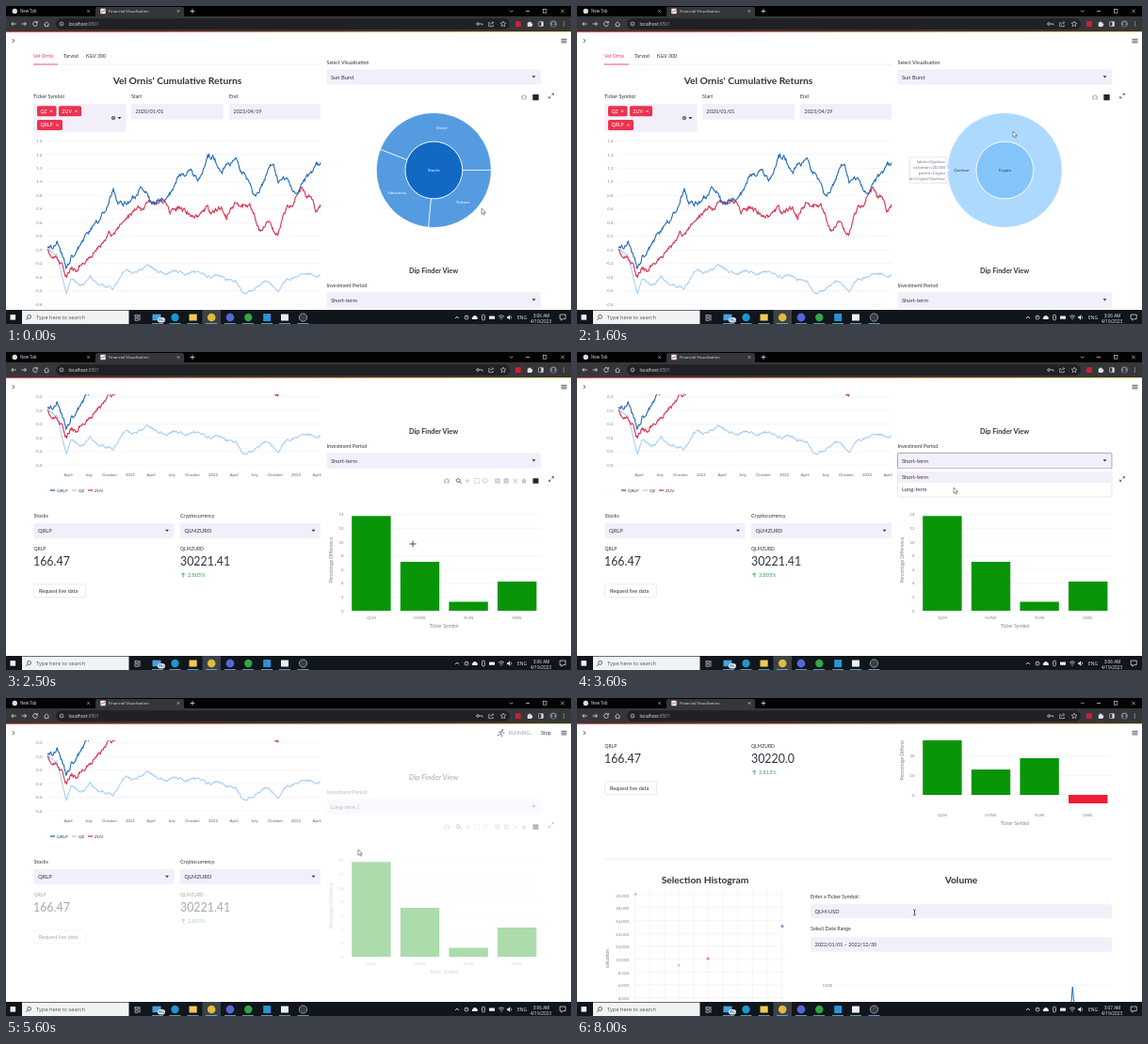
Write an HTML page that moves like this. It is 600 by 338 pixels and loops after 8100 ms.

```html
<!DOCTYPE html>
<html lang="en">
<head>
<meta charset="utf-8">
<title>Financial Visualisation</title>
<style>
html,body{margin:0;width:100%;height:100%;overflow:hidden;background:#fff}
svg{display:block;width:100vw;height:100vh}
text{font-family:Lato,"Open Sans",sans-serif;white-space:pre}
.ui text{font-family:"Open Sans","Noto Sans",sans-serif}
</style>
</head>
<body>
<svg id="stage" viewBox="0 0 600 338" xmlns="http://www.w3.org/2000/svg"></svg>
<script>
const LOOP = 8100, STEP = 100;
const INK = '#31333f', MUTE = '#7d8092', FIELD = '#f3effa', GRID = '#ece9f3';
const BLUE = '#1f69bb', RED = '#d9304d', SKY = '#a6cff5', GREEN = '#089508';

// drawing helpers; text y is the middle of the capitals
const text = (x, y, s, size = 5.35, o = {}) =>
  `<text x="${x}" y="${(y + size * .36).toFixed(2)}" font-size="${size}" fill="${o.fill || INK}" ` +
  `text-anchor="${o.at || 'start'}" font-weight="${o.weight || 400}"${o.turn ? ` transform="rotate(-90 ${x} ${y})"` : ''}>${s}</text>`;
const rect = (x, y, w, h, fill, r = 0, extra = '') =>
  `<rect x="${x}" y="${y}" width="${w}" height="${h}" fill="${fill}" rx="${r}" ${extra}/>`;
const disc = (x, y, r, fill, extra = '') => `<circle cx="${x}" cy="${y}" r="${r}" fill="${fill}" ${extra}/>`;
const line = (d, color, w = .7, extra = '') =>
  `<path d="${d}" fill="none" stroke="${color}" stroke-width="${w}" ${extra}/>`;
const group = (id, body, extra = '') => `<g id="${id}" ${extra}>${body}</g>`;
const title = (x, y, s, size = 10.3) => text(x, y, s, size, { at: 'middle', weight: 700 });
const arrow = (x, y) => `<path d="M${x - 2} ${y - 1}h4l-2 2.3z" fill="${INK}"/>`;
const cross = (x, y, r, c, w = .6) => line(`M${x - r} ${y - r}l${2 * r} ${2 * r}m0 ${-2 * r}l${-2 * r} ${2 * r}`, c, w);
const field = (x, y, w, s, size = 5.8, h = 16.5) => rect(x, y, w, h, FIELD, 1.5) + text(x + 4.5, y + h / 2, s, size);
const select = (x, y, w, s) => field(x, y, w, s) + arrow(x + w - 7.5, y + 8);

function random(seed) {
  return () => (seed = (seed * 16807) % 2147483647) / 2147483647;
}
function wiggle(ys, amp, seed) {
  const rnd = random(seed);
  let d = '', n = 0;
  for (let x = 0; x < 290; x += .7) {
    const i = Math.floor(x / 5), f = x / 5 - i;
    n = n * .6 + (rnd() - .5) * amp;
    d += (d ? 'L' : 'M') + (44 + x).toFixed(1) + ' ' + (ys[i] + (ys[i + 1] - ys[i]) * f + n).toFixed(1);
  }
  return d;
}

const blueY = [258,256,251,264,279,267,262,255,246,240,233,227,218,208,194,210,209,211,204,201,193,197,209,210,206,204,200,190,181,180,
  173,178,184,176,158,160,166,176,171,168,160,173,182,191,203,199,186,174,165,186,181,185,197,202,191,183,178,170,166];
const redY = [260,264,269,275,288,278,281,275,271,269,261,257,250,241,246,235,229,225,221,213,218,212,208,210,205,208,219,215,214,217,
  220,223,224,217,215,221,216,214,225,215,209,213,211,212,223,238,236,228,239,243,225,212,213,198,194,203,200,221,212];
const skyY = [261,262,264,285,307,290,294,297,295,286,292,296,297,298,300,293,283,282,284,282,280,275,277,280,283,286,283,281,283,285,
  284,283,282,284,287,289,286,287,291,290,292,301,305,303,302,297,292,293,299,303,294,291,289,287,286,285,285,287,285];

function returnsChart() {
  let s = '';
  for (let i = 0; i <= 12; i++) {
    const y = 143.5 + i * 14.46, v = 1.6 - i * .2;
    s += line(`M44 ${y}H334`, GRID, .5) + text(38.5, y, (Math.abs(v) < .01 ? 0 : v).toFixed(1), 4.4, { at: 'end', fill: MUTE });
  }
  const months = ['April', 'July', 'October'];
  for (let i = 0; i < 13; i++)
    s += text(66 + i * 22, 327, i % 4 === 3 ? 2021 + (i - 3) / 4 : months[i % 4], 4.4, { at: 'middle', fill: '#5f6275' });
  s += line(wiggle(skyY, 2.2, 77), SKY, 1.1) + line(wiggle(redY, 3.8, 41), RED, 1.1) + line(wiggle(blueY, 4, 19), BLUE, 1.1);
  [[47, BLUE, 'QRLP'], [70, SKY, 'QZ'], [87, RED, 'ZUV']].forEach(([x, c, n]) =>
    s += line(`M${x} 344h5`, c, 1.3) + text(x + 7, 344, n, 4.6));
  return s;
}

function chip(x, y, w, s) {
  return rect(x, y, w, 11, '#ea3350', 1.5) + text(x + 3.5, y + 5.5, s, 5.2, { fill: '#fff' }) + cross(x + w - 5.5, y + 5.5, 1.2, '#fff');
}

function topLeft() {
  return text(29, 53.5, 'Vel Ornis', 5.35, { fill: '#f0435a' }) + text(61, 53.5, 'Tarvod') + text(85, 53.5, 'K&amp;V 300') +
    line('M29 62.2H334', '#e9e8ef', .7) + line('M29 62H55', '#f0435a', .9) +
    title(182, 79, "Vel Ornis' Cumulative Returns") +
    text(29, 96, 'Ticker Symbol') + rect(29, 104, 98.5, 30, FIELD, 1.5) +
    chip(33, 106.3, 20.5, 'QZ') + chip(56, 106.3, 24, 'ZUV') + chip(33, 121, 27, 'QRLP') +
    disc(114, 119, 2.1, '#4b4d5a') + cross(114, 119, .8, '#fff', .5) + arrow(120.5, 119) +
    text(133, 96, 'Start') + field(133, 104, 98, '2020/01/01', 5.4) +
    text(237, 96, 'End') + field(237, 104, 97, '2023/04/19', 5.4);
}

const camera = (x, y) => rect(x - 3, y - 1.8, 6, 4.2, '#c3c4ce', .6) + rect(x - 1.2, y - 2.7, 2.4, 1.2, '#c3c4ce') + disc(x, y + .3, 1.2, '#fff');
const expand = (x, y) => line(`M${x + .6} ${y - .6}l1.8 -1.8m-1.8 0h1.8v1.8M${x - .6} ${y + .6}l-1.8 1.8m1.8 0h-1.8v-1.8`, '#4b4d5a', .8);

function modebar(y) {
  const c = '#c3c4ce';
  return camera(468, y) +
    disc(480.3, y - .5, 1.9, 'none', `stroke="#62647a" stroke-width="1"`) + line(`M481.6 ${y + .9}l2 2`, '#62647a', 1) +
    line(`M487.5 ${y}h5M490 ${y - 2.6}v5.2`, c, .9) +
    rect(497.5, y - 2.5, 5, 5, 'none', 0, `stroke="${c}" stroke-width=".8" stroke-dasharray="1 .5"`) +
    `<ellipse cx="509" cy="${y - .5}" rx="2.8" ry="1.9" fill="none" stroke="${c}" stroke-width=".8"/>` + line(`M507.3 ${y + 1}l-.7 2`, c) +
    rect(519.3, y - 2.6, 5.2, 5.2, c) + line(`M520.4 ${y}h3M521.9 ${y - 1.5}v3`, '#fff', .8) +
    rect(528.6, y - 2.6, 5.2, 5.2, c) + line(`M529.7 ${y}h3`, '#fff', .8) +
    cross(541, y, 2.4, c, .9) +
    `<path d="M547 ${y}l3 -2.8l3 2.8h-1v2.5h-4v-2.5z" fill="${c}"/>` +
    rect(559.5, y - 2.8, 6, 5.6, '#24252f', .6) + expand(579, y - 2);
}

// tick step, pixel per tick, baseline and bar tops are in page coordinates
function barChart(step, count, gap, base, tops) {
  const names = ['QLM', 'HVNX', 'YLVN', 'OSRL'];
  let s = '';
  for (let i = 0; i <= count; i++) {
    const y = base - i * gap;
    s += line(`M362 ${y}H568`, GRID, .5) + text(358.5, y, i * step, 4.4, { at: 'end', fill: MUTE });
  }
  tops.forEach((top, i) => {
    s += rect(367.2 + i * 51.6, Math.min(top, base), 41.4, Math.abs(base - top), top > base ? '#ee1c34' : GREEN) +
      text(388 + i * 51.5, 479, names[i], 4.3, { at: 'middle', fill: MUTE });
  });
  return s;
}

function rightSide() {
  const center = { at: 'middle', fill: MUTE };
  return text(340.5, 60, 'Select Visualisation') + select(340.5, 67.3, 227.5, 'Sun Burst') +
    camera(550, 97) + rect(559.3, 94, 6.4, 6.2, '#24252f', .6) + expand(579, 95.5) +
    group('burst', '') +
    title(454, 281, 'Dip Finder View', 7.3) + text(340.5, 297, 'Investment Period') +
    rect(340.5, 304.3, 227.5, 16.5, FIELD, 1.5, 'id="period"') + arrow(560.5, 312.3) +
    group('short', text(345, 312.5, 'Short-term', 5.8)) +
    group('long', text(345, 312.5, 'Long-term', 5.8) + line('M374 309.5v6', INK, .5)) +
    modebar(334) +
    group('bars1', barChart(2, 7, 14.6, 472, [371.3, 420, 462.5, 441])) +
    group('bars2', barChart(10, 4, 20.6, 458, [371.5, 431, 419, 467])) +
    text(465, 488, 'Ticker Symbol', 5, center) + text(345, 418, 'Percentage Difference', 5, { ...center, turn: 1 });
}

function lower() {
  let s = line('M29 526H568', '#e4e2ea', .6) + title(136, 548, 'Selection Histogram') + title(408, 548, 'Volume');
  for (let i = 0; i < 9; i++) {
    const y = 564 + i * 13.7;
    s += line(`M61 ${y}H219`, '#efe4ef', .5) +
      text(55, y + 1, (20 - 2 * i) + ',000', 4.4, { at: 'end', fill: MUTE });
  }
  for (let x = 61.5; x < 220; x += 15.6) s += line(`M${x} 560V690`, '#f1e6f1', .5);
  s += text(32, 632, 'valuation', 5, { at: 'middle', fill: MUTE, turn: 1 });
  [[62, 563.5, '#a9d3ef'], [108, 639, '#b9d6ea'], [139, 632, '#ea7d93'], [218, 597.5, '#6a9ae0']].forEach(([x, y, c]) => s += disc(x, y, 1.6, c));
  return s + text(248, 566, 'Enter a Ticker Symbol:') + field(248, 574.3, 320, 'QLM-USD', 5.6, 15) +
    text(248, 600.5, 'Select Date Range') + field(248, 609.3, 320, '2022/01/01 – 2022/12/30', 5.4, 15.5) +
    text(271, 660.5, '120B', 4.4, { at: 'end', fill: MUTE }) + line('M275 660.5H568', GRID, .5) +
    line('M524.8 682L526.2 662L527 670L528 682', BLUE, 1);
}

function leftLower() {
  return group('picks',
      text(29.5, 371, 'Stocks') + select(29.5, 378.8, 149, 'QRLP') +
      text(185, 371, 'Cryptocurrency') + select(185, 378.8, 149, 'QLMZURD')) +
    group('metrics',
      text(29.5, 406, 'QRLP', 5) + text(29, 420, '166.47', 12.4) + text(185, 406, 'QLMZURD', 5) +
      group('price1', text(185, 420, '30221.41', 12.4) + text(193, 434, '2.805%', 5.6, { fill: '#2f9c58' })) +
      group('price2', text(185, 420, '30220.0', 12.4) + text(193, 434, '2.813%', 5.6, { fill: '#2f9c58' })) +
      line('M188.3 436.5v-4.6m-2 2l2 -2l2 2', '#2f9c58', .8) +
      rect(29.5, 443.8, 55, 14, '#fff', 1.5, 'stroke="#dddbe3" stroke-width=".6"') + text(35, 451, 'Request live data', 5.5));
}

function pageOverlay() {
  const note = { at: 'end', fill: '#6f7288' };
  const box = 'stroke="#cfc6e2" stroke-width=".5"';
  return group('tip1', `<path d="M353.5 160.8h39.5v11l3 2.7l-3 2.7v11h-39.5z" fill="#fff" ${box}/>` +
      ['labels=Quelmar', 'valuation=20,000', 'parent=Crypto', 'id=Crypto/Quelmar'].map((s, i) => text(391, 165.5 + i * 6, s, 4.4, note)).join('')) +
    group('tip2', `<path d="M462 230h36v8h-36z" fill="#fff" ${box}/>` + text(463.5, 234, '(HVNX, 13.16151)', 4.2, { fill: '#6f7288' })) +
    group('menu', rect(340.5, 124, 227.5, 30, '#fff', 2, 'stroke="#dcd8e6" stroke-width=".6"') +
      rect(341, 127, 226.5, 12, FIELD) + text(345, 133, 'Short-term', 5.8) + text(345, 145.5, 'Long-term', 5.8));
}

function header() {
  return rect(0, 27, 600, 18, '#fff') + rect(0, 26.7, 600, 1.3, 'url(#glow)') +
    line('M6.8 35l2 2l-2 2', INK, .8) + line('M589.5 35.3h6M589.5 37.1h6M589.5 38.9h6', INK, .8) +
    group('running',
      group('legsA', line('M526.5 35.5l-1.5 2.5l2 1.2l-.5 2.3M525 38l-1.2 1.6h-2M526.5 35.6l-2.4 .4l-1 1.2M526.5 35.8l1.4 1.4l1.5 -.4', '#777988', .9)) +
      group('legsB', line('M526.3 35.5l-1 2.8l1.8 .8l1 2M525.3 38.2l.2 1.8l-2 1.2M526.3 35.6l-1.6 1.6l.6 1M526.3 35.8l1.8 .6l.9 -1.3', '#777988', .9)) +
      disc(527.3, 34, 1, '#777988') + text(534, 37, 'RUNNING...', 4.7, { fill: '#9a9ba6' }) + text(568, 37, 'Stop', 5.3));
}

function browser() {
  const w = '#dfe1e5';
  let s = rect(0, 0, 600, 12, '#030304') + rect(0, 11, 600, 16, '#35363a') + `<path d="M95 11V3q0-2 2-2H187q2 0 2 2V11z" fill="#35363a"/>` +
    disc(9.3, 5.5, 2.7, '#dadce0') + text(15, 5.5, 'New Tab', 4.4, { fill: w }) + cross(87.5, 5.5, 1.2, w) +
    rect(100.3, 2.8, 5.4, 5.4, '#f1f1f1', .4) + line('M101 7l1.5 -2l1 1l1.6 -2.4', '#d63838', .7) +
    text(109, 5.5, 'Financial Visualisation', 4.2, { fill: w }) + cross(183, 5.5, 1.2, w) + line('M195.7 5.5h4.6M198 3.2v4.6', w, .8) +
    line('M535 4.7l1.6 1.6l1.6 -1.6M552 5.5h4', w) + rect(570.3, 3.6, 3.6, 3.6, 'none', 0, `stroke="${w}" stroke-width=".6"`) + cross(591, 5.5, 1.8, w);
  s += line('M10.8 19h-5m2 -2l-2 2l2 2', w, .8) + line('M16.5 19h5m-2 -2l2 2l-2 2', w, .8) +
    line('M33 17.6a2.4 2.4 0 1 0 .4 1.8M33.4 16.2v1.8h-1.9', w, .8) + line('M40.5 19.3l2.6 -2.4l2.6 2.4M41.3 19v2.6h3.6v-2.6', w, .7) +
    rect(53, 13.2, 482, 11.8, '#202124', 5.9) + disc(59, 19, 2, 'none', `stroke="${w}" stroke-width=".6"`) + line('M59 18.7v1.4M59 17.6v.5', w, .6) +
    text(66.5, 19, 'localhost<tspan fill="#9aa0a6">:8501</tspan>', 4.8, { fill: '#f0f1f3' }) +
    disc(501, 19, 1.3, 'none', `stroke="${w}" stroke-width=".7"`) + line('M502.3 19h3.6v1.4', w) +
    line('M514 17.6h-1.3v4h4.6v-1.6M514.4 19.8q.4 -2.2 3.2 -2.2m-1.2 -1.2l1.3 1.2l-1.3 1.2', w, .6) +
    line('M528 16.2l.9 1.8l2 .2l-1.5 1.4l.4 2l-1.8 -1l-1.8 1l.4 -2l-1.5 -1.4l2 -.2z', w, .6) +
    rect(541, 16.2, 5.8, 5.8, '#cf2036', 1) + `<path d="M553.8 17.4h1.3a1 1 0 0 1 2 0h1.3v1.4a1 1 0 0 1 0 2v1.2h-4.6z" fill="${w}"/>` +
    rect(565.6, 16.7, 4.8, 4.8, 'none', .6, `stroke="${w}" stroke-width=".6"`) + rect(568.4, 16.7, 2, 4.8, w) +
    disc(581.3, 19, 3.6, '#76808c') + disc(581.3, 18.2, 1.2, '#262b33') + `<path d="M579 21.6q2.3 -4 4.6 0z" fill="#262b33"/>`;
  return s + [17, 19, 21].map(y => disc(592.3, y, .55, w)).join('');
}

function taskbar() {
  const w = '#eef1f4', c = { at: 'middle', fill: w };
  let s = rect(0, 323, 600, 15, '#10161c') + rect(4.5, 328, 5.6, 5.6, '#eef3f8') +
    rect(17, 323.6, 113.5, 14.4, '#f1f2f3') + disc(24.6, 330.3, 2, 'none', 'stroke="#333" stroke-width=".7"') + line('M23.2 331.8l-2 2', '#333') +
    text(32, 331, 'Type here to search', 5.7, { fill: '#4e5257' }) +
    rect(137, 328.6, 3.2, 2.2, 'none', 0, `stroke="${w}" stroke-width=".6"`) + rect(137, 332, 3.2, 2.2, 'none', 0, `stroke="${w}" stroke-width=".6"`) + line('M142 328v6.5', w, .7) +
    rect(208.5, 323, 19.5, 15, '#3b4248') +
    rect(155.5, 327.6, 9, 6.6, '#45a4e0') + rect(161, 331, 8, 5.4, '#dfe9f0', 2.7) + text(165, 333.8, '99+', 3.6, { at: 'middle', fill: '#1c2530' }) +
    disc(179.5, 331, 4.2, '#1f96cc') + rect(194.5, 327.5, 8.2, 7, '#f4ca55') + disc(218.2, 331, 4.3, '#e5b93c') +
    disc(238, 331, 4.4, '#5865d6') + disc(257.3, 331, 4.2, '#32a644') + rect(273.2, 327, 8, 8, '#2b93d6') +
    rect(292, 327.5, 8, 7, '#edf0f2') + disc(315.5, 331, 4.2, '#3d3c42', 'stroke="#b9b9be" stroke-width=".7"');
  [161, 179.5, 198.5, 218, 238, 257, 277, 296, 315.5].forEach(x => s += line(`M${x - 6} 337.5h12`, '#7cb5df', .8));
  s += line('M477 332l2 -2l2 2', w, .8) + disc(489, 331, 2, 'none', `stroke="${w}" stroke-width=".7"`) + line('M489 329.5v1.7', w, .6) +
    `<path d="M495.4 333a1.4 1.4 0 0 1 .5 -2.6a2.1 2.1 0 0 1 3.9 -.1a1.5 1.5 0 0 1 .5 2.7z" fill="${w}"/>` +
    rect(505.5, 328.2, 3, 5.6, 'none', 1.2, `stroke="${w}" stroke-width=".7"`) +
    rect(513, 329.4, 6, 3.4, w, .4) + line('M523 330q3 -2.6 6 0M524.2 331.5q1.8 -1.6 3.6 0', w, .7) + disc(526, 333, .6, w) +
    `<path d="M532.2 330h1.2l1.8 -1.7v5.4l-1.8 -1.7h-1.2z" fill="${w}"/>` + line('M536.3 329.6q1.2 1.4 0 2.8', w, .6) +
    text(548, 331, 'ENG', 4.9, c) + group('am1', text(568.5, 329.5, '3:06 AM', 4.7, c)) + group('am2', text(568.5, 329.5, '3:07 AM', 4.7, c)) +
    text(568, 335.2, '4/19/2023', 4.7, c) + `<path d="M588.2 328h6v4.6h-3l-1.4 1.6v-1.6h-1.6z" fill="none" stroke="${w}" stroke-width=".7"/>`;
  return s;
}

const pointers =
  group('arrow', `<path d="M0 0V6.2L1.5 4.9L2.5 7.1L3.5 6.6L2.5 4.5H4.4Z" fill="#fff" stroke="#333" stroke-width=".5"/>`) +
  group('plus', line('M-3.8 0h7.6M0 -3.8v7.6', '#fff', 1.8) + line('M-3.6 0h7.2M0 -3.6v7.2', '#222', .8)) +
  group('move', line('M-3.6 0h7.2M0 -3.6v7.2', '#233', 1.7) + line('M-3.4 0h6.8M0 -3.4v6.8', '#fff', 1)) +
  group('beam', line('M-1.5 -3q1.5 0 1.5 .8v4.4q0 .8 1.5 .8M1.5 -3q-1.5 0 -1.5 .8v4.4q0 .8 -1.5 .8', '#444', .7));

const stage = document.getElementById('stage');
stage.innerHTML = `<defs><linearGradient id="glow"><stop stop-color="#ff4b4b"/><stop offset="1" stop-color="#f3d76c"/></linearGradient></defs>` +
  rect(0, 0, 600, 338, '#fff') +
  group('page', topLeft() + returnsChart() + leftLower() + group('right', rightSide()) + lower()) +
  pageOverlay() + header() + group('browser', browser(), 'class="ui"') + group('tasks', taskbar(), 'class="ui"') + group('pointer', pointers);
const el = id => document.getElementById(id);

// sunburst: share of the whole, depth, colours
const total = 54, cut = 34 / total;
const slices = [
  ['Stocks', 0, cut, 1, '#1169c4', '#fff'], ['Ostrel', 0, 15 / total, 2, '#559be0', '#fff'],
  ['Holvranex', 15 / total, 25 / total, 2, '#559be0', '#fff'], ['Yulvarn', 25 / total, cut, 2, '#559be0', '#fff'],
  ['Crypto', cut, 1, 1, '#84c5fb', INK], ['Quelmar', cut, 1, 2, '#aed9fe', INK]];

function burst(from, to, depth) {
  const cx = 454.3, cy = 174.5, R = 61;
  const ring = k => Math.max(0, R * (k - depth) / (3 - depth));
  const turn = v => Math.min(1, Math.max(0, (v - from) / (to - from))) * 2 * Math.PI;
  const pt = (r, a) => `${(cx + r * Math.cos(a)).toFixed(2)} ${(cy - r * Math.sin(a)).toFixed(2)}`;
  const circle = r => r < .1 ? '' : `M${cx - r} ${cy}a${r} ${r} 0 1 0 ${2 * r} 0a${r} ${r} 0 1 0 ${-2 * r} 0z`;
  return slices.map(([name, x0, x1, k, fill, ink]) => {
    const a = turn(x0), b = turn(x1), r0 = ring(k), r1 = ring(k + 1), full = b - a > 6.28;
    if (b - a < .01) return '';
    const big = b - a > Math.PI ? 1 : 0;
    const d = full ? circle(r1) + circle(r0)
      : `M${pt(r0, a)}L${pt(r1, a)}A${r1} ${r1} 0 ${big} 0 ${pt(r1, b)}L${pt(r0, b)}A${r0} ${r0} 0 ${big} 1 ${pt(r0, a)}z`;
    const mid = (a + b) / 2, r = full && r0 < .1 ? 0 : (r0 + r1) / 2;
    const label = full || (b - a) * r > 10
      ? text((cx + r * Math.cos(mid)).toFixed(2), cy - r * Math.sin(mid), name, 4.4, { at: 'middle', fill: ink }) : '';
    return `<path d="${d}" fill="${fill}" fill-rule="evenodd" stroke="#fff" stroke-width=".7"/>` + label;
  }).join('');
}

// linear reading of [time, ...values] rows
function at(rows, t) {
  let i = 0;
  while (i < rows.length - 2 && t >= rows[i + 1][0]) i++;
  const [a, b] = [rows[i], rows[i + 1]];
  const f = Math.min(1, Math.max(0, (t - a[0]) / (b[0] - a[0])));
  return a.slice(1).map((v, j) => v + (b[j + 1] - v) * f);
}

const scrollAt = [[1800, 0], [1900, 30], [2200, 180], [2400, 197], [7300, 197], [7400, 215], [7700, 340], [7900, 355]];
const burstAt = [[300, 0, cut, 1], [800, 0, 1, 0], [1000, 0, 1, 0], [1500, cut, 1, 1]];
const pointerAt = [[0, 505, 215], [300, 456, 174], [600, 456, 174], [900, 468, 203], [1100, 468, 203], [1500, 463, 133], [1800, 463, 133],
  [2100, 450, 180], [2400, 432, 204], [2600, 432, 204], [3000, 470, 116], [3200, 470, 116], [3600, 400, 144], [3700, 400, 144],
  [4100, 372.5, 163.5], [5600, 374, 161], [6500, 374, 161], [7000, 441.5, 247], [7400, 441.5, 247], [7800, 358.5, 228]];
const fades = {
  right: [[3700, 1], [4300, .5], [4800, .33], [6400, .33], [6500, 1]],
  picks: [[3700, 1], [4300, .42], [4700, .33], [5000, .33], [5100, 1]],
  metrics: [[3700, 1], [4300, .58], [4800, .42], [5900, .42], [6000, 1]]
};
// visible spans [from, to)
const spans = {
  tip1: [1500, 1800], tip2: [7000, 7400], menu: [3100, 3700], running: [3700, 6600],
  short: [0, 3700], long: [3700, LOOP], bars1: [0, 6500], bars2: [6500, LOOP],
  price1: [0, 6000], price2: [6000, LOOP], am1: [0, 6700], am2: [6700, LOOP],
  plus: [2300, 2700], move: [6800, 7500], beam: [7700, LOOP]
};
const show = (id, on) => el(id).setAttribute('visibility', on ? 'inherit' : 'hidden');

function draw(t) {
  el('page').setAttribute('transform', `translate(0 ${-at(scrollAt, t)[0]})`);
  el('pointer').setAttribute('transform', `translate(${at(pointerAt, t).join(' ')})`);
  el('burst').innerHTML = burst(...at(burstAt, t));
  for (const id in fades) el(id).setAttribute('opacity', at(fades[id], t)[0]);
  for (const id in spans) show(id, t >= spans[id][0] && t < spans[id][1]);
  show('arrow', !['plus', 'move', 'beam'].some(id => t >= spans[id][0] && t < spans[id][1]));
  const stride = t / 200 % 2 < 1;
  show('legsA', stride);
  show('legsB', !stride);
  const focus = t >= 3100 && !(t >= 5000 && t < 6500);
  el('period').setAttribute('stroke', focus ? '#8f76b5' : 'none');
  el('period').setAttribute('stroke-width', .7);
}

const start = performance.now();
let last = -1;
function tick(now) {
  const t = Math.floor(Math.max(0, now - start) % LOOP / STEP) * STEP;
  if (t !== last) draw(last = t);
  requestAnimationFrame(tick);
}
draw(0);
requestAnimationFrame(tick);
</script>
</body>
</html>
```
